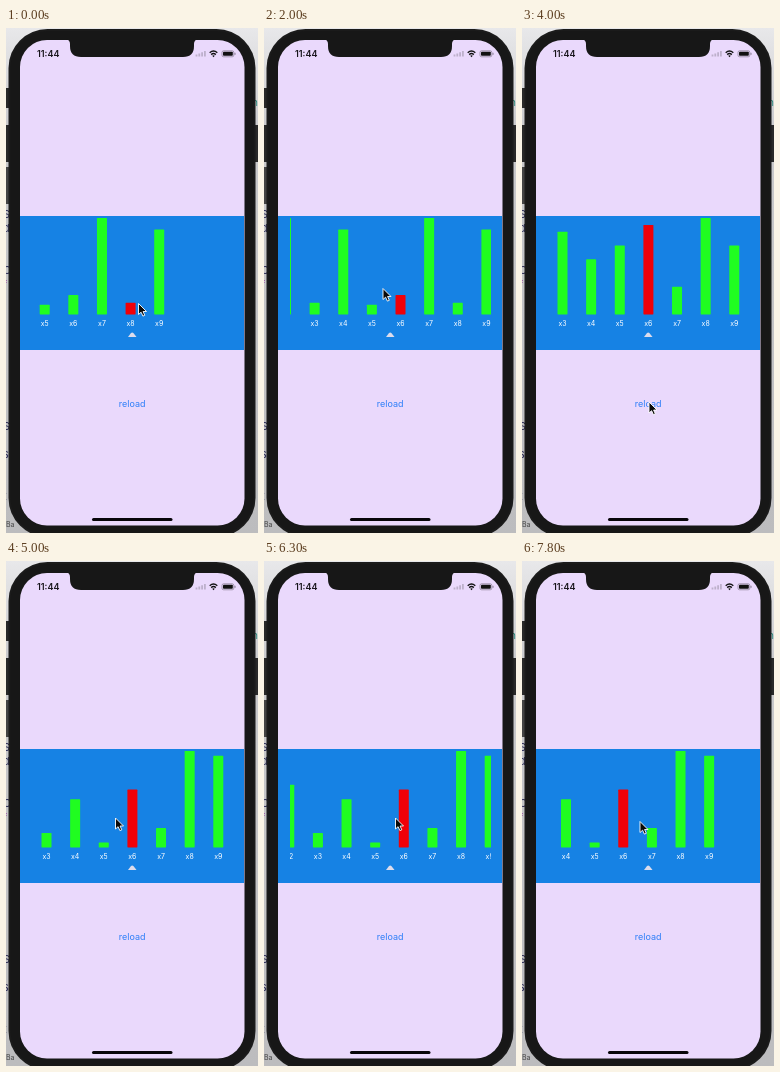
Write an HTML page that moves like this. It is 252 by 505 pixels and loops after 8 s.

```html
<!DOCTYPE html>
<html lang="en">
<head>
<meta charset="utf-8">
<style>
  html, body { margin: 0; width: 100%; height: 100%; overflow: hidden; background: #c6c6c8; }
  svg { display: block; width: 252px; height: 505px; font-family: Inter, sans-serif; }
</style>
</head>
<body>
<svg viewBox="0 0 252 505">
  <defs>
    <clipPath id="plot"><rect x="26" y="188" width="201" height="134"/></clipPath>
    <linearGradient id="desk" x2="0" y2="1">
      <stop stop-color="#e8e8ea"/>
      <stop offset=".2" stop-color="#cacacc"/>
      <stop offset="1" stop-color="#bcbcbe"/>
    </linearGradient>
  </defs>

  <!-- window behind the phone -->
  <rect width="252" height="505" fill="url(#desk)"/>
  <g fill="#292929">
    <rect y="60" width="20" height="20"/>
    <rect y="97" width="252" height="37"/>
    <rect y="139" width="20" height="37" fill="#444"/>
  </g>
  <g font-size="11" fill="#333" id="backdrop"></g>
  <text x="0" y="499" font-size="7" fill="#444">Ba</text>
  <text x="246" y="78" font-size="10" fill="#2b8a7c">n</text>

  <!-- phone -->
  <rect x="2.5" y="1" width="247" height="508" rx="39" fill="#1b1b1b"/>
  <rect x="4.5" y="3" width="243" height="504" rx="37" fill="#171717"/>
  <rect x="14" y="12" width="224.5" height="485.5" rx="27" fill="#ead9fc"/>
  <path d="M60 11H192Q188 12 188 16V18Q188 29 177 29H75Q64 29 64 18V16Q64 12 60 11Z" fill="#171717"/>
  <rect x="86" y="490" width="80.5" height="3" rx="1.5" fill="#08060a"/>

  <!-- status bar -->
  <text x="31" y="29" font-size="9" font-weight="600" fill="#17141a">11:44</text>
  <path d="M190.5 28.5v-2M193.3 28.5v-3M196.1 28.5v-4.2M198.9 28.5v-5.5" stroke="#bdb0cb" stroke-width="1.8"/>
  <path d="M203.7 24.8Q207.5 21.4 211.3 24.8M205.2 26.6Q207.5 24.6 209.8 26.6" fill="none" stroke="#111" stroke-width="1.4"/>
  <path d="M206.2 27.8Q207.5 26.7 208.8 27.8L207.5 29.2Z" fill="#111"/>
  <rect x="216" y="22.8" width="11.8" height="6" rx="1.6" fill="none" stroke="#85798f" stroke-width=".7"/>
  <rect x="217" y="23.8" width="9.8" height="4" rx=".8" fill="#111"/>
  <path d="M229 24.8v2" stroke="#85798f"/>

  <!-- chart -->
  <rect x="14" y="188" width="224" height="134" fill="#1682e4"/>
  <g clip-path="url(#plot)"><g id="bars" font-size="7" fill="#fff" text-anchor="middle"></g></g>
  <path d="M122 309L125 305Q126.2 303.8 127.4 305L130.5 309Z" fill="#dcdcec"/>
  <text x="126.2" y="378.6" font-size="9" text-anchor="middle" fill="#2f7ff8">reload</text>

  <path id="cursor" d="M0 0V11L2.6 8.7L4.4 12.6L6.3 11.8L4.6 8H8Z" fill="#0a0a0a" stroke="#fff" stroke-width=".9" stroke-linejoin="round"/>
</svg>
<script>
const LOOP = 8000, STEP = 28.63, BASE = 286.4, TALLEST = 96.4, CENTER = 126.4;
const FIRST = 2, COUNT = 8;
const $ = id => document.getElementById(id);

function add(parent, tag, attrs, text = '') {
  const el = document.createElementNS('http://www.w3.org/2000/svg', tag);
  for (const key in attrs) el.setAttribute(key, attrs[key]);
  return el.textContent = text, parent.appendChild(el);
}

// ends of code lines showing beside the phone
[...'Sd: Cf         S s  t'].forEach((ch, line) =>
  add($('backdrop'), 'text', { x: -3, y: 190 + 14.1 * line, fill: ch === 'f' ? '#93349b' : '#2b2b55' }, ch));

// data for each reload: a repeating pattern, then random integers
const items = Array.from({ length: COUNT }, (_, i) => i + FIRST);
const pattern = [10, 20, 100, 12, 88];
const random = n => Math.abs(Math.sin(n * 12.9898) * 43758.5453) % 1;
const sets = [
  items.map(n => pattern[n % 5]),
  items.map(n => 1 + Math.floor(20 * random(n))),
  [13, 3, 10, 1, 12, 4, 20, 19]
];

const bars = items.map((n, i) => {
  add($('bars'), 'text', { x: i * STEP, y: 298 }, 'x' + n);
  return add($('bars'), 'rect', { x: i * STEP - 5, width: 10, rx: .6 });
});

// each drag pulls the centred item right, slowing down until release
const drags = [
  { start: 140, release: 1000, item: 8, picked: 8, pull: 25 },
  { start: 1000, release: 2500, item: 6, picked: 6, pull: 25.7 },
  { start: 5100, release: 6800, item: 6, picked: 6, pull: 29.7 },
  { start: 7400, release: LOOP, item: 7, picked: 6, pull: 19.3 }
];
const pointer = [
  [0, 132.5, 275.5], [1000, 104, 260.5], [1300, 106.5, 260.5], [2000, 119, 260.5],
  [3000, 134, 320.5], [3400, 127, 374], [4400, 127, 374], [5000, 109.5, 257],
  [6300, 131.5, 257], [7400, 114, 260.5], [7800, 118, 260.5], [LOOP, 120, 260.5]
];

const smooth = u => u * u * (3 - 2 * u);
const clamp = u => Math.min(1, Math.max(0, u));

function dragOffset({ start, release, pull }, t) {
  const held = Math.min(t, release) - start;
  return pull * (1 - Math.exp(-held / 2000)) * (1 - smooth(clamp((t - release) / 300)));
}

function pointerAt(t) {
  const i = pointer.findIndex(key => key[0] > t);
  const [t0, x0, y0] = pointer[i - 1], [t1, x1, y1] = pointer[i];
  const u = smooth((t - t0) / (t1 - t0));
  return [x0 + (x1 - x0) * u, y0 + (y1 - y0) * u];
}

function draw(now) {
  const t = Math.floor(now % LOOP / 100) * 100;
  const drag = drags.filter(d => d.start <= t).pop() || drags[0];
  const values = sets[t < 3600 ? 0 : t < 4400 ? 1 : 2];
  const unit = TALLEST / Math.max(...values);
  bars.forEach((bar, i) => {
    bar.setAttribute('y', BASE - values[i] * unit);
    bar.setAttribute('height', values[i] * unit);
    bar.setAttribute('fill', items[i] === drag.picked ? '#f00008' : '#20fd20');
  });
  const x = CENTER + dragOffset(drag, t) - (drag.item - FIRST) * STEP;
  $('bars').setAttribute('transform', `translate(${x})`);
  $('cursor').setAttribute('transform', `translate(${pointerAt(t)})`);
}

const begin = performance.now();
function frame() {
  draw(performance.now() - begin);
  requestAnimationFrame(frame);
}
frame();
</script>
</body>
</html>
```
